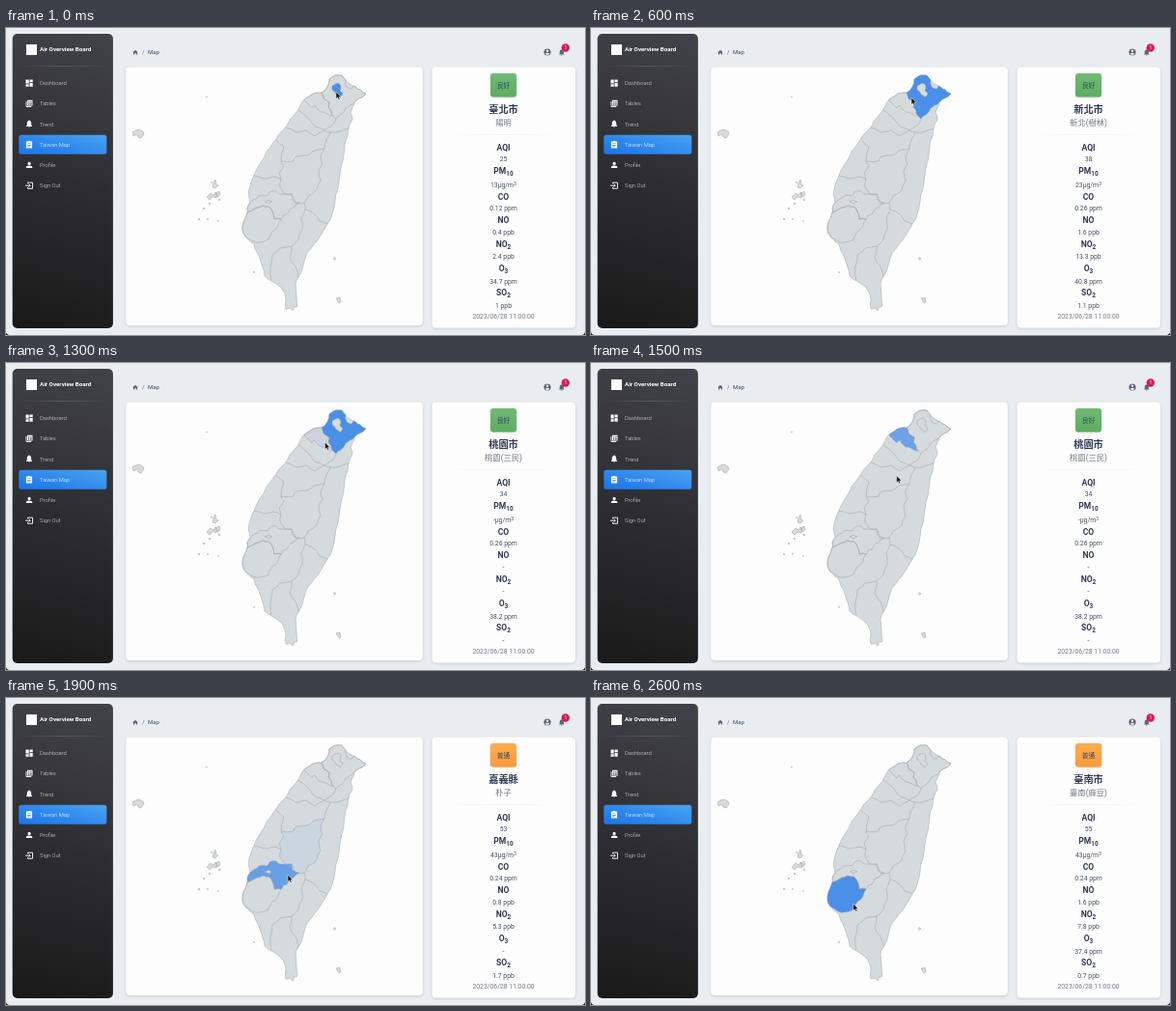
Recreate the animation shown at these times as an HTML page. Size 600x318 px, loop 2.7 s.

```html
<!DOCTYPE html>
<html lang="en">
<head>
<meta charset="utf-8">
<title>Air quality map</title>
<style>
  html, body { margin: 0; width: 100%; height: 100%; overflow: hidden; background: #16181a; }
  svg { display: block; width: 600px; height: 318px; font-family: Roboto, "Noto Sans CJK TC", "Noto Sans CJK", sans-serif; }
  .card { fill: #fdfdfd; filter: drop-shadow(0 1px 1.5px #0002); }
  .land path { fill: #d5dadd; stroke: #979da4; stroke-width: .45; stroke-linejoin: round; }
  #regions path { fill: #4a8fe8; fill-rule: evenodd; stroke: none; }
  #borders path { fill: none; }
  #menu { fill: #fff; font-size: 5.8px; font-weight: 300; }
  #menu .line { fill: none; stroke: #fff; stroke-width: .9; }
  #panel { text-anchor: middle; fill: #465066; font-size: 6.8px; }
  #panel .label { font-size: 8.5px; font-weight: 700; fill: #303a54; }
  #panel .soft { fill: #747989; }
  .top { fill: #5d6677; }
</style>
</head>
<body>
<svg viewBox="0 0 600 318">
  <defs>
    <linearGradient id="dark" gradientUnits="userSpaceOnUse" x1="100.6" y1="3" x2="17.4" y2="314"><stop stop-color="#42424a"/><stop offset="1" stop-color="#191919"/></linearGradient>
    <linearGradient id="blue" gradientUnits="userSpaceOnUse" x1="64" y1="100.3" x2="53" y2="141.7"><stop stop-color="#49a3f1"/><stop offset="1" stop-color="#1a73e8"/></linearGradient>
    <linearGradient id="good" x1="0" y1="0" x2="0" y2="1"><stop stop-color="#71ba74"/><stop offset="1" stop-color="#5dac61"/></linearGradient>
    <linearGradient id="fair" x1="0" y1="0" x2="0" y2="1"><stop stop-color="#ffad50"/><stop offset="1" stop-color="#fb9a3a"/></linearGradient>
    <linearGradient id="rule"><stop stop-color="#888" stop-opacity="0"/><stop offset=".5" stop-color="#888" stop-opacity=".15"/><stop offset="1" stop-color="#888" stop-opacity="0"/></linearGradient>
    <linearGradient id="lightRule"><stop stop-color="#fff" stop-opacity="0"/><stop offset=".5" stop-color="#fff" stop-opacity=".22"/><stop offset="1" stop-color="#fff" stop-opacity="0"/></linearGradient>
  </defs>
  <rect y="-10" width="600" height="328" rx="4" fill="#e9edf0"/>

  <rect x="6.7" y="6" width="104.2" height="305" rx="5" fill="url(#dark)"/>
  <rect x="21" y="17" width="11" height="11" fill="#fff"/>
  <rect x="13" y="39.3" width="92" height=".7" fill="url(#lightRule)"/>
  <rect x="13.3" y="110.8" width="91" height="20" rx="2.5" fill="url(#blue)"/>
  <g id="menu">
    <text x="35" y="24.3" font-size="6.2" font-weight="700">Air Overview Board</text>
    <path d="M20.500 53.500h3.200v4h-3.200zM24.500 53.500h3.200v2.400h-3.200zM20.500 58.300h3.200v2.400h-3.200zM24.500 56.700h3.200v4h-3.200z"/>
    <path class="line" d="M21 76v5.500h5.200"/>
    <path fill-rule="evenodd" d="M22 74.800h5.500v5.600h-5.500zM22.800 76.300v1h1.600v-1zM25.100 76.300v1h1.600v-1zM22.800 78.200v1.200h1.600v-1.200zM25.100 78.200v1.200h1.600v-1.200z"/>
    <path d="M21 102v-.7l.8-.8v-2.200q0-2 1.700-2.400v-.5h1v.5q1.700.4 1.700 2.400v2.200l.8.800v.7zM23.200 102.500h1.600q-.8 1.400-1.600 0z"/>
    <path fill-rule="evenodd" d="M20.900 117.500h1.900q1.200-1.500 2.400 0h1.900v7h-6.200zM22.200 119.400v.7h3.600v-.7zM22.200 121v.7h3.600v-.7zM22.200 122.600v.7h2.400v-.7z"/>
    <path d="M22.500 140.400a1.600 1.600 0 1 1 3.200 0a1.600 1.600 0 1 1-3.200 0M20.900 145v-.8q0-1.600 3.200-1.700q3.200.1 3.200 1.700v.8z"/>
    <path class="line" d="M22.500 161.300v-1.200h5v6.200h-5V165M20 163.200h5M23.600 161.600l1.600 1.600l-1.600 1.600"/>
  </g>

  <g class="top">
    <path d="M131.200 25.200L134 22.700L136.800 25.200H136V27.500H134.700V25.900H133.300V27.500H132V25.200Z"/>
    <text x="141" y="27.200" font-size="6">/</text>
    <text x="147" y="27.200" font-size="6" fill="#344767">Map</text>
    <circle cx="561" cy="25" r="3.600"/>
    <circle cx="561" cy="23.800" r="1.200" fill="#e9edf0"/>
    <path d="M558.700 26.700q2.300-1.700 4.600 0q-2.300 2.500-4.600 0" fill="#e9edf0"/>
    <path d="M573 27.500l.7-.8v-2q0-2.200 2.100-2.500q2.100.3 2.100 2.500v2l.7.800zM575 28h1.600q-.8 1.300-1.600 0z"/>
    <circle cx="579.800" cy="20.500" r="4.200" fill="#d81b55"/>
    <text x="579.800" y="22.300" font-size="5" fill="#fff" text-anchor="middle">1</text>
  </g>

  <rect class="card" x="124.300" y="40.500" width="307.500" height="267.500" rx="4"/>
  <rect class="card" x="441.500" y="40.500" width="148.500" height="270" rx="4"/>

  <g class="land">
    <g id="coast"></g>
    <g id="regions"></g>
    <g id="borders"></g>
    <g id="islands"></g>
    <path d="M131 108l3-2l4-1l4 2l1 3l-3 4l-3-1l-1-3l-4 2zM208 175l4-4l3 2l2-3l2 2l-1 4l-4-1l-3 3zM217 171l4-2l1 4l-3 2zM214 165l1-5l2-3l1 5l2 1l-3 3zM342 280l4-1l1 5l-2 1z"/>
  </g>
  <path id="cursor" d="M0 0V7.300L1.700 5.900L2.800 8.300L4.100 7.700L3 5.400H5.200Z" fill="#111" stroke="#fff" stroke-width=".5"/>

  <g id="panel">
    <rect id="badge" x="502" y="47" width="27" height="24.500" rx="3" style="filter:drop-shadow(0 .5px 1px #0003)"/>
    <text id="grade" x="515.500" y="61.700" fill="#344767"></text>
    <text id="city" x="515.500" y="88.200" font-size="10.200" font-weight="700" fill="#303a54"></text>
    <text id="station" class="soft" x="515.500" y="100.700" font-size="8.300"></text>
    <rect x="458" y="110" width="115" height=".7" fill="url(#rule)"/>
    <text class="soft" x="515.500" y="300.500">2023/06/28 11:00:00</text>
  </g>
</svg>
<script>
const $ = id => document.getElementById(id);
const LOOP = 2700, STEP = 100, FADE = 200;

function add(parent, tag, attrs, text = "") {
  const el = document.createElementNS("http://www.w3.org/2000/svg", tag);
  for (const key in attrs) el.setAttribute(key, attrs[key]);
  el.textContent = text;
  return parent.appendChild(el);
}

// Bends each edge at its middle; neighbours sharing an edge get the same bend
function rough(d) {
  let px, py;
  return d.replace(/([ML])([\d.]+) ([\d.]+)/g, (point, command, a, b) => {
    const x = +a, y = +b, h = (x + px) * 12.9 + (y + py) * 78.2;
    const bend = command === "L" ? `L${(x + px) / 2 + Math.sin(h) * .8} ${(y + py) / 2 + Math.cos(h) * .8}` : "";
    [px, py] = [x, y];
    return bend + point;
  });
}
const addShape = (id, d) => add($(id), "path", { d: rough(d) });

["Dashboard", "Tables", "Trend", "Taiwan Map", "Profile", "Sign Out"].forEach((name, i) =>
  add($("menu"), "text", { x: 35, y: 59.2 + i * 21.2, opacity: i === 3 ? 1 : .85 }, name));

addShape("coast", "M327 67L333 61L335 53L341 49L348 49L352 54L355 57L360 60L364 63L369 66L373 68L366 73L361 77L359 82L357 87L359 95L355 104L354 112L351 122L350 131L348 141L346 152L344 166L341 180L338 193L333 203L326 215L319 224L312 233L308 246L303 258L300 266L301 277L302 288L298 289L297 293L293 290L290 291L290 281L286 270L277 263L268 257L265 245L261 234L257 224L248 216L245 209L246 201L250 191L250 187L253 181L252 176L252 167L256 155L263 141L270 128L279 116L288 105L294 95L302 86L306 78L312 72L318 68Z");

const taipei = "M338 60L344 57L347 61L346 65L349 68L346 72L342 69L338 64Z";
const nantou = "M330 125L326 133L328 141L324 148L326 158L322 168L313 174L309 181L300 182L296 172L288 171L284 165L285 157L283 150L288 143L285 138L298 138L301 133L312 132L319 127Z";
const chiayi = "M250 191L250 187L253 181L258 177L262 174L270 174L273 170L280 169L284 172L296 172L297 178L304 181L298 186L293 189L291 193L287 194L285 198L278 198L276 190L272 185L266 184L260 186ZM268 180L272 178L276 180L273 182Z";
const tainan = "M250 191L260 186L266 184L272 185L276 190L278 198L285 198L282 205L276 211L272 219L262 222L256 221L248 216L245 209L246 201Z";
const taoyuan = "M309 75L312 72L318 68L327 67L329 73L335 77L334 82L337 86L339 91L333 89L326 87L320 80L317 83Z";
const newTaipei = "M327 67L333 61L335 53L341 49L348 49L352 54L353 61L358 63L360 60L364 63L369 66L373 68L366 73L361 77L356 80L352 83L347 90L342 94L339 91L337 86L334 82L335 77L329 73Z" + taipei;

[nantou, chiayi, tainan, taoyuan, newTaipei,
  "M342 94L338 101L330 106L320 102L314 94L303 85M290 103L300 108L311 106L320 112L330 106L336 108L346 107L355 104M336 108L332 116L330 125",
  "M280 116L288 123L285 138M257 153L268 156L277 154L285 157",
  "M309 181L310 188L320 193L325 200L333 203M310 188L306 197L307 208L303 219L296 226L284 228L276 235L274 247L275 261M296 226L294 238L300 247L303 258"
].forEach(d => addShape("borders", d));

// Islets: x, y, radius
[[208, 71.5, .7], [205, 187, 1], [200, 198, 1], [209, 198, .8], [211, 182, 1], [221, 178, 1.1],
 [213, 160, .8], [220, 200, .7], [340.5, 239, 1.4], [257, 253, .8]].forEach(([x, y, r]) =>
  add($("islands"), "path", { d: `M${x - r} ${y}l${r} ${-r}l${r} ${r}l${-r} ${r}z` }));

// Each region is lit from enter to leave
const regions = [
  [taipei, -900, 300], [newTaipei, 300, 1300], [taoyuan, 1285, 1450],
  [nantou, 1590, 1715], [chiayi, 1745, 2200], [tainan, 2190, 9999]
].map(([d, enter, leave]) => ({ el: addShape("regions", d), enter, leave }));

// Label, subscript, unit, label baseline, value baseline
const rows = [
  ["AQI", "", "", 127, 137.7], ["PM", "10", "μg/m", 151.2, 165], ["CO", "", " ppm", 177.5, 189],
  ["NO", "", " ppb", 202, 213.5], ["NO", "2", " ppb", 226.5, 239], ["O", "3", " ppm", 252, 264.5],
  ["SO", "2", " ppb", 277, 290]
].map(([name, sub, unit, y, valueY]) => {
  const label = add($("panel"), "text", { class: "label", x: 515.5, y }, name);
  if (sub) add(label, "tspan", { dy: 2, "font-size": 6.4 }, sub);
  return { unit, el: add($("panel"), "text", { x: 515.5, y: valueY }) };
});

const readings = [
  [0, "good", "臺北市", "陽明", "25 13 0.12 0.4 2.4 34.7 1"],
  [300, "good", "新北市", "新北(樹林)", "38 23 0.26 1.6 13.3 40.8 1.1"],
  [1300, "good", "桃園市", "桃園(三民)", "34 - 0.26 - - 38.2 -"],
  [1600, "good", "南投縣", "埔里", "24 18 0.16 1.6 1.9 33.3 1.1"],
  [1800, "fair", "嘉義縣", "朴子", "53 43 0.24 0.8 5.3 - 1.7"],
  [2200, "fair", "臺南市", "臺南(麻豆)", "55 43 0.24 1.6 7.8 37.4 0.7"]
];

const cursorPath = [[0, 342, 66], [600, 332, 72], [1300, 330.5, 82], [1400, 329, 86], [1700, 292, 178],
  [1900, 292, 183], [2100, 287, 194], [2300, 272.5, 213], [2700, 271.5, 213]];

function cursorAt(t) {
  const i = cursorPath.findIndex(p => p[0] > t);
  const [t0, x0, y0] = cursorPath[i - 1], [t1, x1, y1] = cursorPath[i];
  const k = (t - t0) / (t1 - t0);
  return [x0 + (x1 - x0) * k, y0 + (y1 - y0) * k];
}

const clamp = v => Math.max(0, Math.min(1, v));
let shown;

function showReading(reading) {
  if (reading === shown) return;
  shown = reading;
  const [, grade, city, station, values] = reading;
  $("badge").setAttribute("fill", `url(#${grade})`);
  $("grade").textContent = grade === "good" ? "良好" : "普通";
  $("city").textContent = city;
  $("station").textContent = station;
  values.split(" ").forEach((value, i) => {
    const { el, unit } = rows[i], mass = i === 1;
    el.textContent = value === "-" && !mass ? value : value + unit;
    if (mass) add(el, "tspan", { dy: -2.5, "font-size": 5.2 }, "3");
  });
}

function draw(now) {
  const t = Math.floor(now % LOOP / STEP) * STEP;
  for (const { el, enter, leave } of regions)
    el.style.opacity = Math.min(clamp((t - enter) / FADE), 1 - clamp((t - leave) / FADE));
  $("cursor").setAttribute("transform", `translate(${cursorAt(t)})`);
  showReading(readings.findLast(r => r[0] <= t));
}

let start;
function tick(now) {
  start ??= now;
  draw(now - start);
  requestAnimationFrame(tick);
}
draw(0);
requestAnimationFrame(tick);
</script>
</body>
</html>
```
